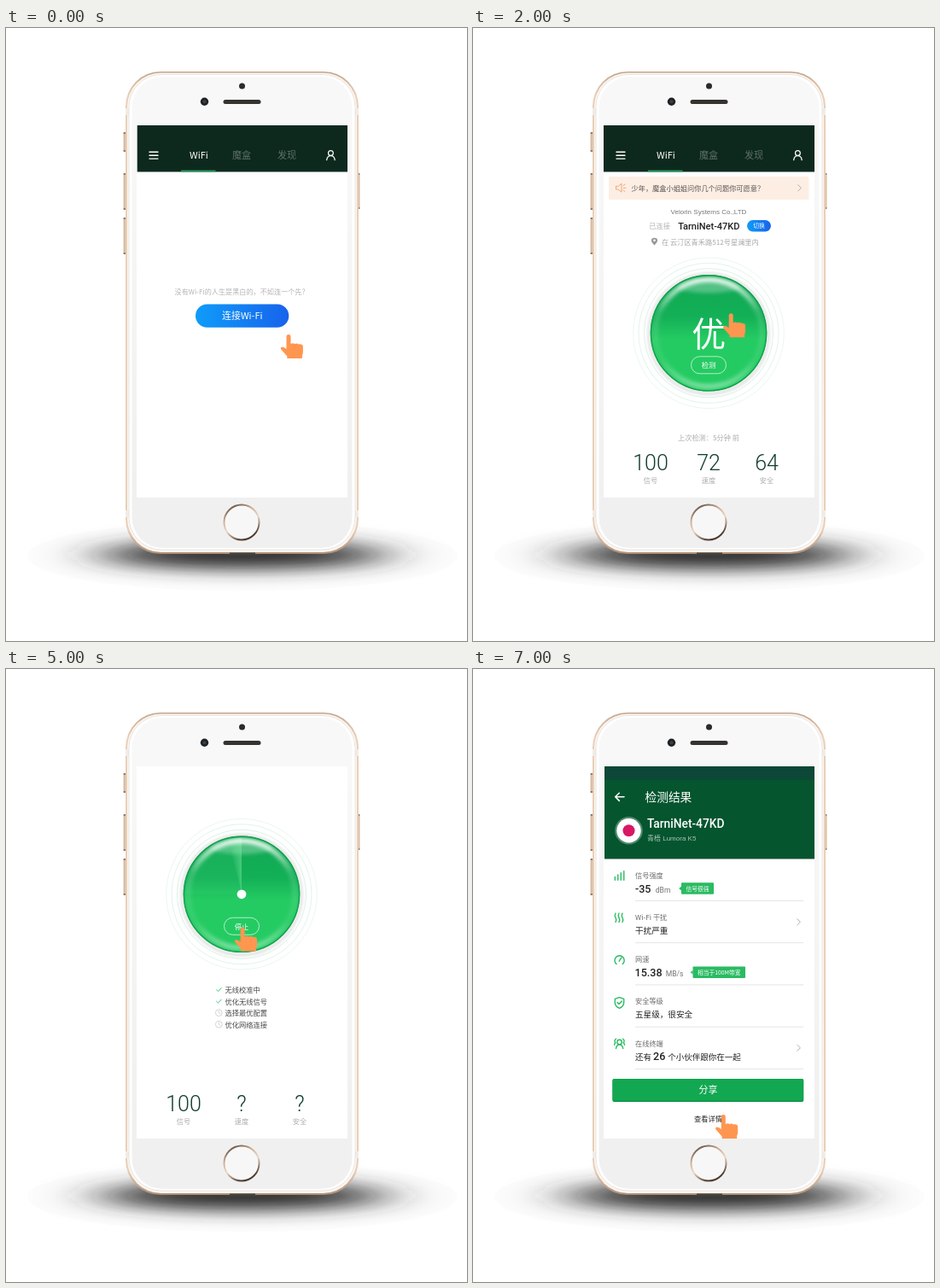
An HTML page that plays this animation: 540x718 px, repeating every 8 s.

```html
<!DOCTYPE html>
<html lang="zh-CN">
<head>
<meta charset="utf-8">
<title>Wi-Fi</title>
<style>
html, body { margin: 0; width: 100%; height: 100%; overflow: hidden; background: #fff }
svg { display: block; width: 100%; height: 100% }
text { font-family: "Noto Sans CJK SC", "Noto Sans CJK", sans-serif; white-space: pre }
.roboto { font-family: Roboto, "Noto Sans CJK SC", sans-serif }
.arial { font-family: "Liberation Sans", "Noto Sans CJK SC", sans-serif }
.mid { text-anchor: middle }
.bold { font-weight: 500 }
.thin { font-weight: 300 }
.line { fill: none; stroke-linecap: round; stroke-linejoin: round }
</style>
</head>
<body>
<svg id="stage" viewBox="0 0 540 718">
  <defs>
    <linearGradient id="gold" x2="0" y2="1">
      <stop offset="0" stop-color="#c4a58b"/><stop offset=".05" stop-color="#e9cfb8"/>
      <stop offset=".95" stop-color="#e9cfb8"/><stop offset="1" stop-color="#ae8f76"/>
    </linearGradient>
    <linearGradient id="face" x2="0" y2="1">
      <stop offset=".1" stop-color="#f8f8f8"/><stop offset=".9" stop-color="#f0f0f0"/>
    </linearGradient>
    <linearGradient id="home" x2=".5" y2="1">
      <stop offset="0" stop-color="#3a2c24"/><stop offset=".35" stop-color="#c9a88f"/>
      <stop offset=".65" stop-color="#ecd8c6"/><stop offset="1" stop-color="#4f3a2e"/>
    </linearGradient>
    <linearGradient id="blue">
      <stop offset="0" stop-color="#0f9cf9"/><stop offset="1" stop-color="#1763ec"/>
    </linearGradient>
    <linearGradient id="green" x2="0" y2="1">
      <stop offset="0" stop-color="#0fa752"/><stop offset=".36" stop-color="#13b057"/>
      <stop offset=".55" stop-color="#24cb62"/><stop offset="1" stop-color="#24cb62"/>
    </linearGradient>
    <linearGradient id="gloss" x2="0" y2="1">
      <stop offset="0" stop-color="#fff" stop-opacity=".95"/><stop offset=".3" stop-color="#fff" stop-opacity=".15"/>
      <stop offset=".75" stop-color="#fff" stop-opacity=".08"/><stop offset="1" stop-color="#fff" stop-opacity=".4"/>
    </linearGradient>
    <filter id="soft" x="-20%" y="-60%" width="140%" height="220%"><feGaussianBlur stdDeviation="2"/></filter>
    <filter id="shade" filterUnits="userSpaceOnUse" x="0" y="540" width="540" height="160">
      <feGaussianBlur stdDeviation="36 10"/>
    </filter>
  </defs>
</svg>
<script>
const stage = document.getElementById('stage');
const rect = (x, y, w, h, fill, rx = 0, more = '') =>
  `<rect x="${x}" y="${y}" width="${w}" height="${h}" rx="${rx}" fill="${fill}" ${more}/>`;
const circle = (x, y, r, fill, more = '') => `<circle cx="${x}" cy="${y}" r="${r}" fill="${fill}" ${more}/>`;
const ellipse = (x, y, rx, ry, fill, more = '') =>
  `<ellipse cx="${x}" cy="${y}" rx="${rx}" ry="${ry}" fill="${fill}" ${more}/>`;
const line = (d, color, width = 1) => `<path class="line" d="${d}" stroke="${color}" stroke-width="${width}"/>`;
const text = (x, y, size, fill, str, cls = '') =>
  `<text x="${x}" y="${y}" font-size="${size}" fill="${fill}" class="${cls}">${str}</text>`;
const chevron = (x, y, color) => line(`M${x} ${y - 3.5}l3.6 3.5-3.6 3.5`, color, .9);
const network = 'TarniNet-47KD';

function phone() {
  const side = (x, y, h) => rect(x, y, 4, h, '#d8bea6', 1.5) + rect(x, y, 4, 2, '#8f7a68', 1) + rect(x, y + h - 2, 4, 2, '#8f7a68', 1);
  const bands = [94, 565].map(y => rect(140, y, 4.5, 8, '#f1ece7') + rect(408.5, y, 4.5, 8, '#f1ece7')).join('');
  return ellipse(277, 618.5, 252, 41, '#fcfcfc') +
    ellipse(277, 617, 168, 17, '#2c2c2c', 'filter="url(#shade)"') +
    side(137.5, 122, 23) + side(137.5, 170, 43) + side(137.5, 222, 43) + side(410.5, 170, 42) +
    rect(140, 51, 273, 565, 'url(#gold)', 41) +
    rect(142, 52.5, 269, 561.5, '#fbf5ef', 39.5) + bands +
    rect(144, 54.5, 265, 556.5, '#fff', 38, 'stroke="#e4e0dc" stroke-width=".8"') +
    rect(147.5, 57, 258, 552, 'url(#face)', 36) +
    rect(262, 614.5, 30, 1.8, '#4b463c') +
    circle(276.5, 68, 3.5, '#2b2b2d') + circle(232.5, 86.3, 4.7, '#1f2224') + circle(232.5, 86.3, 2, '#3a4048') +
    rect(254.5, 84, 44, 5, '#35322f', 2.5) +
    circle(276, 579, 20.5, '#f7f7f7', 'stroke="url(#home)" stroke-width="1.9"') +
    rect(153, 114, 247, 436, '#fff');
}

const header = left =>
  rect(left, 114, 400 - left, 54.5, '#0d291e') +
  line('M168 145.3h10M168 149.2h10M168 153.1h10', '#fff', 1.4) +
  text(226, 153, 11, '#fff', 'WiFi', 'mid bold') +
  text(276, 153, 11, '#5f7068', '魔盒', 'mid') + text(329, 153, 11, '#5f7068', '发现', 'mid') +
  circle(380.4, 146.5, 2.9, 'none', 'stroke="#fff" stroke-width="1.2"') +
  line('M375.7 154.6q.6-5 4.7-5 4.2 0 4.8 5', '#fff', 1.2) +
  rect(205, 166.6, 40.5, 1.9, '#2b9c64');

function dial(cy, label, inner) {
  const rings = [[88.3, '#e3f5ec'], [82, '#d9f2e5'], [75.5, '#d3eee0']]
    .map(([r, c]) => circle(276, cy, r, 'none', `stroke="${c}" stroke-width=".8"`)).join('');
  return rings + circle(276, cy + 1, 71, '#d5d9d7', 'filter="url(#soft)"') + circle(276, cy, 71, '#ececec') +
    circle(276, cy, 68.3, 'url(#green)') +
    ellipse(276, cy - 54, 36, 7, '#fff', 'opacity=".28" filter="url(#soft)"') +
    inner +
    circle(276, cy, 62.5, 'none', 'stroke="url(#gloss)" stroke-width="6" filter="url(#soft)"') +
    circle(276, cy, 67.6, 'none', 'stroke="#10a04d" stroke-width="1.4"') +
    rect(255.5, cy + 27.5, 41, 20, 'none', 10, 'stroke="#c4f0d4" stroke-width=".9"') +
    text(276, cy + 40.8, 8.3, '#fff', label, 'mid');
}

const stats = values => values.map((v, i) =>
  text(208 + 68 * i, 518, 25, '#123f2c', v, 'mid roboto thin') +
  text(208 + 68 * i, 533.3, 8.2, '#adadad', ['信号', '速度', '安全'][i], 'mid')).join('');

const connectScreen = () => header(153.7) +
  text(197.5, 311.8, 8.15, '#b4b4b4', '没有Wi-Fi的人生是黑白的，不如连一个先？') +
  rect(222, 323.5, 109.3, 27.3, 'url(#blue)', 13.6) +
  text(276.7, 341.3, 11, '#fff', '连接Wi-Fi', 'mid');

const statusScreen = () => header(153) +
  rect(159, 174, 234.5, 27, '#fdeee4', 1.5) +
  line('M167.5 185.5v3.5h2.5l4 3.2v-10l-4 3.3zM176 184.5l2-1.5M176.3 187.3h2.6M176 190l2 1.5', '#f0a068', .9) +
  text(185.5, 190.6, 8.2, '#5a5552', '少年，魔盒小姐姐问你几个问题你可愿意？') + chevron(380.8, 187.3, '#b3a59c') +
  text(276, 218, 8, '#777', 'Velorin Systems Co.,LTD', 'mid arial') +
  text(206.3, 234.7, 8.2, '#b5b5b5', '已连接') +
  text(276.3, 235.7, 11, '#222', network, 'mid roboto bold') +
  rect(321, 225, 28, 13.6, 'url(#blue)', 6.8) + text(335, 234.3, 6.8, '#fff', '切换', 'mid') +
  '<path d="M212.5 254.5q-3.6-3.7-3.6-5.6a3.6 3.2 0 0 1 7.2 0q0 1.9-3.6 5.6z" fill="#999"/>' + circle(212.5, 248.8, 1.3, '#fff') +
  text(221, 253.6, 8.2, '#a9a9a9', '在 云汀区青禾路512号星澜里内') +
  dial(357.3, '检测', text(276.3, 372.5, 40, '#fff', '优', 'mid thin')) +
  text(276, 483, 8.2, '#adadad', '上次检测：5分钟 前', 'mid') +
  stats(['100', '72', '64']);

function scanScreen() {
  const cy = 263.8;
  let sweep = '';
  for (let deg = 2; deg <= 14; deg += 2) {
    const a = deg * Math.PI / 180;
    sweep += `<path d="M276 ${cy}V${cy - 66}A66 66 0 0 0 ${276 - 66 * Math.sin(a)} ${cy - 66 * Math.cos(a)}z" fill="#8cebb0" opacity=".07"/>`;
  }
  sweep += `<path d="M276 ${cy}V${cy - 66}A66 66 0 0 0 210 ${cy}z" fill="#5be08d" opacity=".1"/>` + circle(276, cy, 5.4, '#fff');
  const steps = ['无线校准中', '优化无线信号', '选择最优配置', '优化网络连接'].map((s, i) => {
    const y = 376 + 13.55 * i;
    const icon = i < 2 ? line(`M246.6 ${y - .3}l1.9 1.9 3.6-3.9`, '#3ec877', 1)
      : circle(249.3, y - .4, 3.9, 'none', 'stroke="#c9c9c9" stroke-width=".8"') + line(`M249.3 ${y - 2.6}v2.4l1.7 1`, '#c9c9c9', .8);
    return icon + text(256.6, y + 3.2, 8.25, '#484848', s);
  });
  return dial(cy, '停止', sweep) + steps.join('') + stats(['100', '?', '?']);
}

function resultScreen() {
  const green = '#2abb62', dark = '#222';
  const tag = (x, y, w, s) => rect(x, y, w, 13.5, green, 1) +
    `<path d="M${x} ${y + 4.5}l-2.8 2.3 2.8 2.3z" fill="${green}"/>` + text(x + w / 2, y + 9.3, 6.75, '#fff', s, 'mid');
  const icons = [
    'M166.3 243.5v3.7M169.8 241v6.2M173.3 238.8v8.4M176.8 236.8v10.4',
    [167, 171, 175].map(x => `M${x} 286q-1.5 2.6 0 5.2t0 5.2`).join(''),
    'M168 345.6a5.6 5.6 0 1 1 7.2 0M171.2 342.2l2.6-4',
    'M171.5 384.6l5.2 1.8v4q0 4.6-5.2 6.9-5.2-2.3-5.2-6.9v-4zM169 390.6l2 2 3.4-3.6',
    'M168.9 437a2.7 2.7 0 1 1 5.4 0 2.7 2.7 0 1 1-5.4 0M167.5 444.5q.5-4.4 4.1-4.4t4.1 4.4M167.5 433.3q-2.6 2-.6 4.6-1.2.8-1.3 2.4M175.6 433.3q2.6 2 .6 4.6 1.2.8 1.3 2.4'
  ];
  const rows = ['信号强度', 'Wi-Fi 干扰', '网速', '安全等级', '在线终端'].map((label, i) =>
    line(icons[i], green, 1.4) + text(190, 244.8 + 49.2 * i, 8.2, '#6b6b6b', label) +
    rect(190, 271 + 49.25 * i, 197, .9, '#e2e2e2')).join('');
  return rect(154, 114, 246, 108.5, '#05552f') + rect(154, 114, 246, 15.5, '#0c4737') +
    line('M177 149.8h-10M171.3 145.2l-4.6 4.6 4.6 4.6', '#fff', 1.5) +
    text(201.5, 154.7, 13.7, '#fff', '检测结果') +
    circle(182.5, 189.3, 16.3, '#4f8a6d') + circle(182.5, 189.3, 14.2, '#fff') + circle(182.5, 189.3, 7, '#d81864') +
    text(204, 186, 13.8, '#fff', network, 'roboto bold') +
    text(204, 201.4, 8, '#a9c8b8', '青梧 Lumora K5', 'arial') +
    rows +
    text(190, 261.7, 12.6, dark, '-35', 'roboto bold') + text(213.7, 261.5, 8.6, '#777', 'dBm', 'roboto') + tag(244, 250.3, 38, '信号很强') +
    text(190, 310, 9.6, dark, '干扰严重') + chevron(379.8, 296.3, '#a5a5a5') +
    text(189.5, 359.8, 12.6, dark, '15.38', 'roboto bold') + text(225.7, 359.6, 8.6, '#777', 'MB/s', 'roboto') + tag(257.5, 348.5, 61.5, '相当于100M带宽') +
    text(190, 408.3, 9.6, dark, '五星级，很安全') +
    text(190, 457.6, 9.5, dark, '还有') + text(211, 458, 12.6, dark, '26', 'roboto bold') + text(228.3, 457.6, 9.5, dark, '个小伙伴跟你在一起') +
    chevron(379.8, 443.8, '#a5a5a5') +
    rect(163.3, 480, 224, 27, '#0c8f44', 2) + rect(163.8, 480.3, 223, 25.4, '#12a852', 1.5) +
    text(275.5, 497, 11, '#fff', '分享', 'mid') +
    text(275.5, 530, 8.2, dark, '查看详情', 'mid bold');
}

const screens = [connectScreen, statusScreen, scanScreen, resultScreen];
const hand = 'M7 2.5a2.5 2.5 0 0 1 5 0V11q2.6-1.6 4.7 0 2.5-1.3 4.7.4 5-.5 5 3.1v6q0 2.5-1 4V28H7.8v-2.6L.8 17.6Q-.6 15.2 1.8 14.4q2.8 0 5.2 2.6z';
stage.innerHTML += phone() + screens.map(s => `<g class="screen">${s()}</g>`).join('') +
  `<path id="hand" d="${hand}" fill="#ff9650"/>`;

// One pose per second; two seconds on each screen
const poses = [[321.5, 359], [300.8, 340.3], [292.7, 334.3], [264.7, 396], [264.7, 396], [267.6, 302.5], [263.8, 306], [283.8, 522]];
const groups = [...stage.querySelectorAll('.screen')];
const pointer = document.getElementById('hand');

function draw() {
  const second = Math.floor(performance.now() / 1000) % poses.length;
  groups.forEach((g, i) => g.style.display = i === second >> 1 ? '' : 'none');
  pointer.setAttribute('transform', `translate(${poses[second]})`);
  requestAnimationFrame(draw);
}
draw();
</script>
</body>
</html>
```
